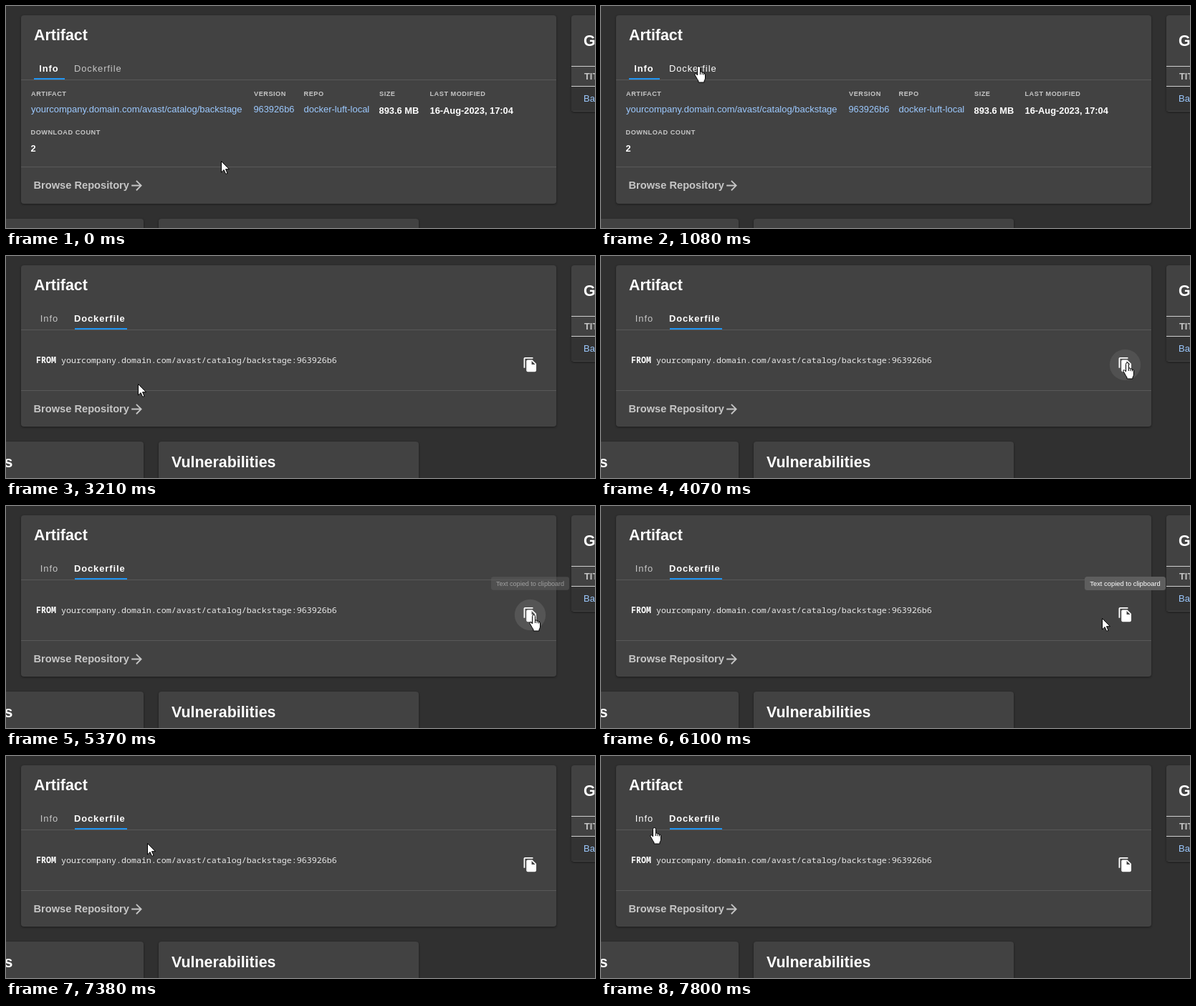
An HTML page for the animation above (8000 ms loop, 822 by 311 pixels).

```html
<!DOCTYPE html>
<html lang="en">
<head>
<meta charset="utf-8">
<title>Artifact card</title>
<style>
html, body { margin: 0; width: 100%; height: 100%; overflow: hidden; background: #303030; }
svg { display: block; }
text { font: 13px "Liberation Sans", Arial, sans-serif; fill: #fff; white-space: pre; }
.card { fill: #424242; filter: drop-shadow(0 1px 1.5px rgba(0, 0, 0, .45)); }
.line { fill: #595959; }
.title { font-size: 21.4px; font-weight: 700; }
.label { font-size: 9.2px; font-weight: 700; letter-spacing: .5px; fill: #c6c6c6; }
.link { fill: #9cc9ff; }
.value { font-size: 12.85px; font-weight: 700; }
.tab { font-size: 12.9px; letter-spacing: .92px; fill: #c6c6c6; }
.tab.hover { fill: #fff; }
.tab.on { font-weight: 700; fill: #fff; }
.more { font-size: 14.65px; font-weight: 700; fill: #c6c6c6; }
.head { font-size: 12.9px; font-weight: 700; fill: #c6c6c6; }
.code { font: 11.67px "Noto Sans Mono", "DejaVu Sans Mono", monospace; fill: #ececec; }
.code tspan { font-weight: 700; fill: #fff; }
#tip { transform-origin: 731.5px 108.5px; }
#tip text { font-size: 9.4px; }
.ptr { fill: #fff; stroke: #000; stroke-width: 1; stroke-linejoin: round; }
</style>
</head>
<body>
<svg width="822" height="311" viewBox="0 0 822 311">
  <rect width="822" height="311" fill="#303030"/>

  <!-- side table -->
  <rect class="card" x="789" y="13" width="60" height="135" rx="4"/>
  <rect x="789" y="113" width="33" height="34" fill="#333"/>
  <rect x="789" y="84" width="33" height="1" fill="#cfcfcf"/>
  <rect x="789" y="112" width="33" height="1" fill="#cfcfcf"/>
  <text class="title" x="806" y="56">G</text>
  <text class="head" x="807" y="103">TIT</text>
  <text class="link" x="806" y="134">Ba</text>

  <!-- lower cards -->
  <g id="lower">
    <rect class="card" x="-20" y="260" width="212" height="120" rx="4"/>
    <rect class="card" x="213" y="260" width="363" height="120" rx="4"/>
    <text class="title" x="9.5" y="296" text-anchor="end">s</text>
    <text class="title" x="231" y="296">Vulnerabilities</text>
  </g>

  <!-- main card -->
  <rect id="main" class="card" x="21" y="13" width="747" height="264" rx="4"/>
  <text class="title" x="39" y="48">Artifact</text>
  <rect class="line" x="21" y="103" width="747" height="1"/>
  <text id="tabInfo" class="tab" y="92">Info</text>
  <text id="tabFile" class="tab" x="95" y="92">Dockerfile</text>
  <rect id="bar" y="101" height="2" fill="#2196f3"/>

  <g id="info">
    <text class="label" x="35" y="126">ARTIFACT</text>
    <text class="label" x="346" y="126">VERSION</text>
    <text class="label" x="415.5" y="126">REPO</text>
    <text class="label" x="521" y="126">SIZE</text>
    <text class="label" x="591.5" y="126">LAST MODIFIED</text>
    <text class="label" x="34.5" y="180">DOWNLOAD COUNT</text>
    <text class="link" x="35" y="149">yourcompany.domain.com/avast/catalog/backstage</text>
    <rect id="under" x="35" y="150" width="296" height="1" fill="#9cc9ff"/>
    <text class="link" x="345.5" y="149" style="font-size:12.8px">963926b6</text>
    <text class="link" x="415.5" y="149">docker-luft-local</text>
    <text class="value" x="520.5" y="151">893.6 MB</text>
    <text class="value" x="591.5" y="151">16-Aug-2023, 17:04</text>
    <text class="value" x="34.5" y="204">2</text>
  </g>

  <g id="file">
    <text class="code" x="42" y="150"><tspan>FROM</tspan> yourcompany.domain.com/avast/catalog/backstage:963926b6</text>
    <circle id="halo" cx="731.5" cy="152.5" r="21.7" fill="#fff"/>
    <path transform="translate(720.7 141) scale(.92)" fill="#fff" d="M16 1H4c-1.1 0-2 .9-2 2v14h2V3h12V1zm-1 4l6 6v10c0 1.1-.9 2-2 2H8c-1.1 0-2-.9-2-2V7c0-1.1.9-2 2-2h7zm-1 7h5.5L14 6.5V12z"/>
  </g>

  <g id="foot">
    <rect class="line" x="21" y="225" width="747" height="1"/>
    <text class="more" x="38.5" y="256">Browse Repository</text>
    <path transform="translate(171.5 240.5) scale(.92)" fill="#c6c6c6" d="M12 4l-1.41 1.41L16.17 11H4v2h12.17l-5.58 5.59L12 20l8-8z"/>
  </g>

  <g id="tip">
    <rect x="675" y="99" width="113" height="19" rx="3.5" fill="#5e5e5e"/>
    <text x="731.5" y="112" text-anchor="middle">Text copied to clipboard</text>
  </g>

  <g id="arrow" class="ptr">
    <path d="M.5.5V16l3.6-3.4 2.6 5.8 2.4-1-2.6-5.7h5z"/>
  </g>
  <g id="hand" class="ptr">
    <path d="M4.5 13V2.5a2 2 0 0 1 4 0V8q2.2-.6 2.6 1 2-.5 2.4 1 2-.3 2 2v5q0 2-1.5 4v2h-8v-2q-1.5-2-3-5l-2-3.5q-.6-2 1.2-1.8 1 .2 2.3 2.3z"/>
    <path fill="none" d="M8.5 8v4M11.1 9v3.2M13.5 10v2.5"/>
  </g>
  <g id="beam" fill="none" stroke="#d2d2d2">
    <path d="M0 .5h2.5l1 1 1-1H7M3.5 1v14M0 15.5h2.5l1-1 1 1H7"/>
  </g>
</svg>
<script>
const LOOP = 8000;
const $ = id => document.getElementById(id);

// start time, pointer kind, left, top
const moves = [
  [0, 'arrow', 300, 217], [500, 'arrow', 257, 203], [650, 'hand', 197, 138],
  [800, 'arrow', 149, 104], [950, 'hand', 139, 88], [1080, 'hand', 130, 84],
  [2290, 'hand', 135, 98], [2440, 'beam', 178, 134], [2590, 'beam', 178, 136],
  [2740, 'arrow', 181, 178], [3210, 'arrow', 184, 179], [3360, 'arrow', 496, 177],
  [3510, 'arrow', 589, 172], [3680, 'arrow', 660, 158], [3830, 'arrow', 704, 147],
  [3950, 'hand', 722, 143], [4070, 'hand', 728, 149], [4190, 'hand', 730, 152],
  [5950, 'hand', 711, 155], [6100, 'arrow', 699, 157], [6250, 'arrow', 698, 157],
  [6720, 'arrow', 652, 155], [6840, 'arrow', 599, 153], [6990, 'beam', 434, 134],
  [7110, 'beam', 350, 134], [7230, 'arrow', 283, 128], [7380, 'arrow', 197, 122],
  [7500, 'arrow', 124, 117], [7650, 'arrow', 81, 107], [7800, 'hand', 68, 100]
];
const tips = [[0, 0, 1], [5370, .5, .965], [5520, .96, 1], [5670, 1, 1], [7110, .5, .98], [7230, 0, 1]];
const halos = [[0, 0], [3950, .05], [4070, .08], [4190, .1], [6100, 0]];
const bars = [[0, 39, 82], [2160, 75, 137], [2290, 96, 169]];

const at = (steps, t) => steps.findLast(s => s[0] <= t).slice(1);
const within = (t, a, b) => t >= a && t < b;
const show = (id, on) => $(id).style.display = on ? '' : 'none';
const shift = (id, x, y) => $(id).setAttribute('transform', `translate(${x} ${y})`);

function render(t) {
  const opened = t >= 2160;
  show('info', !opened);
  show('file', opened);
  show('under', within(t, 650, 800));
  shift('foot', 0, opened ? -37 : 0);
  shift('lower', 0, opened ? 0 : 38);
  $('main').setAttribute('height', opened ? 226 : 264);

  const info = $('tabInfo'), file = $('tabFile');
  info.setAttribute('x', opened ? 47.8 : 46.2);
  info.classList.toggle('on', !opened);
  info.classList.toggle('hover', t >= 7800);
  file.classList.toggle('on', opened);
  file.classList.toggle('hover', within(t, 950, 2160));

  const [left, right] = at(bars, t);
  $('bar').setAttribute('x', left);
  $('bar').setAttribute('width', right - left);

  $('halo').style.opacity = at(halos, t)[0];
  const [alpha, scale] = at(tips, t);
  $('tip').style.opacity = alpha;
  $('tip').style.transform = `scale(${scale})`;

  const [kind, x, y] = at(moves, t);
  for (const id of ['arrow', 'hand', 'beam']) show(id, id === kind);
  shift(kind, x, y);
}

const start = performance.now();
function tick() {
  render((performance.now() - start) % LOOP);
  requestAnimationFrame(tick);
}
tick();
</script>
</body>
</html>
```
